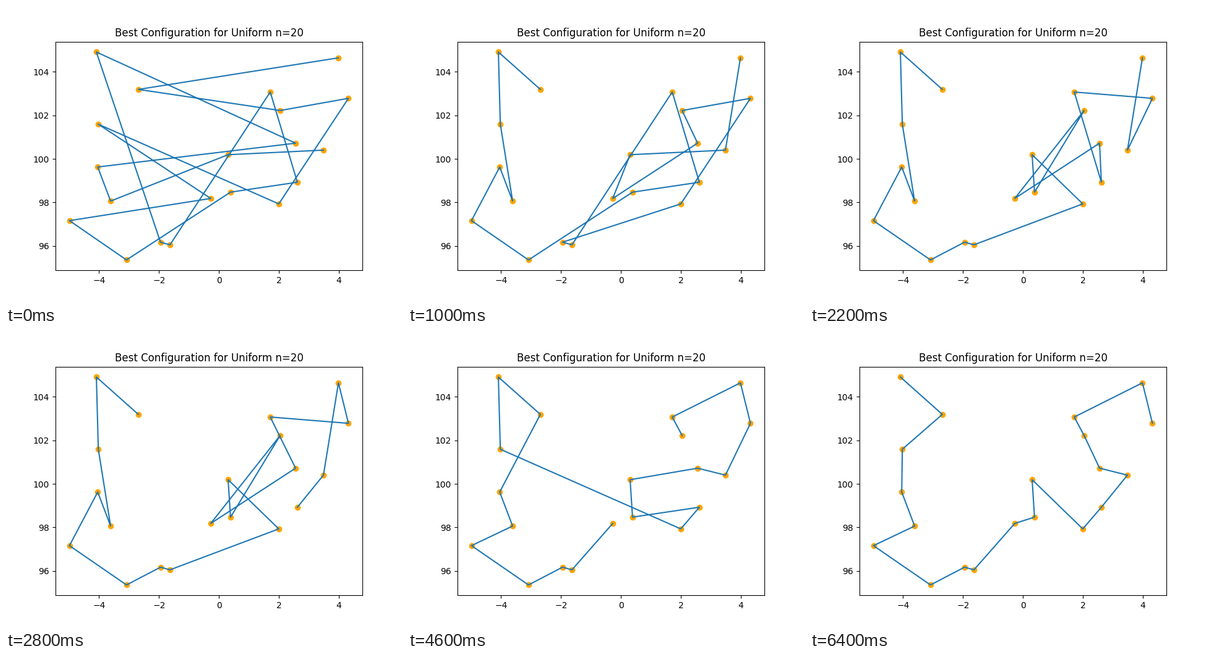
Write a matplotlib script that moves like this. It is 640 px wide and 480 px high and loops after 6600 ms.

```python
import matplotlib.pyplot as plt
import numpy as np
from matplotlib.animation import FuncAnimation

FRAMES, INTERVAL = 33, 200

# Cities, numbered along the shortest path
CITIES = np.array([
    (-4.09, 104.907), (-2.69, 103.19), (-4.025, 101.59), (-4.045, 99.625),
    (-3.615, 98.06), (-4.988, 97.16), (-3.085, 95.355), (-1.95, 96.17),
    (-1.635, 96.05), (-0.275, 98.18), (0.385, 98.47), (0.305, 100.19),
    (1.995, 97.93), (2.615, 98.925), (3.485, 100.4), (2.555, 100.72),
    (2.04, 102.22), (1.71, 103.07), (3.985, 104.64), (4.319, 102.78),
])

# Milestones of the search: step -> visiting order, later ones mostly runs
MILESTONES = {
    0: np.r_[18, 1, 16, 19, 12, 2, 9, 5, 6, 10, 13, 17, 8, 7, 0, 15, 3, 4, 11, 14],
    14: np.r_[1, 0, 2, 4, 3, 5:9, 12:9:-1, 16, 9, 15, 17, 19, 18, 14, 13],
    19: np.r_[18, 19, 16, 14, 9:2:-1, 1, 0, 2, 11, 10, 12, 13, 15, 17],
    27: np.r_[0:4, 5, 4, 6, 8, 7, 9, 12, 13, 10, 11, 15, 14, 19:15:-1],
    FRAMES - 1: np.arange(len(CITIES)),
}


def reversals(start, goal):
    """Orders passed through while 2-opt moves settle goal from its end."""
    tour, states = list(start), [list(start)]
    for i in range(len(tour) - 1, 0, -1):
        j = tour.index(goal[i])
        if j != i:
            tour[j:i + 1] = tour[j:i + 1][::-1]
            states.append(list(tour))
    return states


def build_orders():
    orders = []
    steps = list(MILESTONES)
    for a, b in zip(steps, steps[1:]):
        start, goal = MILESTONES[a], MILESTONES[b]
        states = min(reversals(start, goal), reversals(start, goal[::-1]), key=len)
        picks = np.linspace(0, len(states) - 1, b - a + 1).round().astype(int)
        orders += [states[k] for k in picks[:-1]]
    return orders + [MILESTONES[steps[-1]]]


ORDERS = build_orders()

fig, ax = plt.subplots(figsize=(6.4, 4.8), dpi=100)
ax.set_title("Best Configuration for Uniform n=20")
ax.scatter(*CITIES.T, color="orange")
path, = ax.plot(*CITIES[ORDERS[0]].T, color="tab:blue")


def update(frame):
    path.set_data(*CITIES[ORDERS[frame]].T)
    return path,


anim = FuncAnimation(fig, update, frames=FRAMES, interval=INTERVAL,
                     repeat=True, repeat_delay=0)
plt.show()
```
